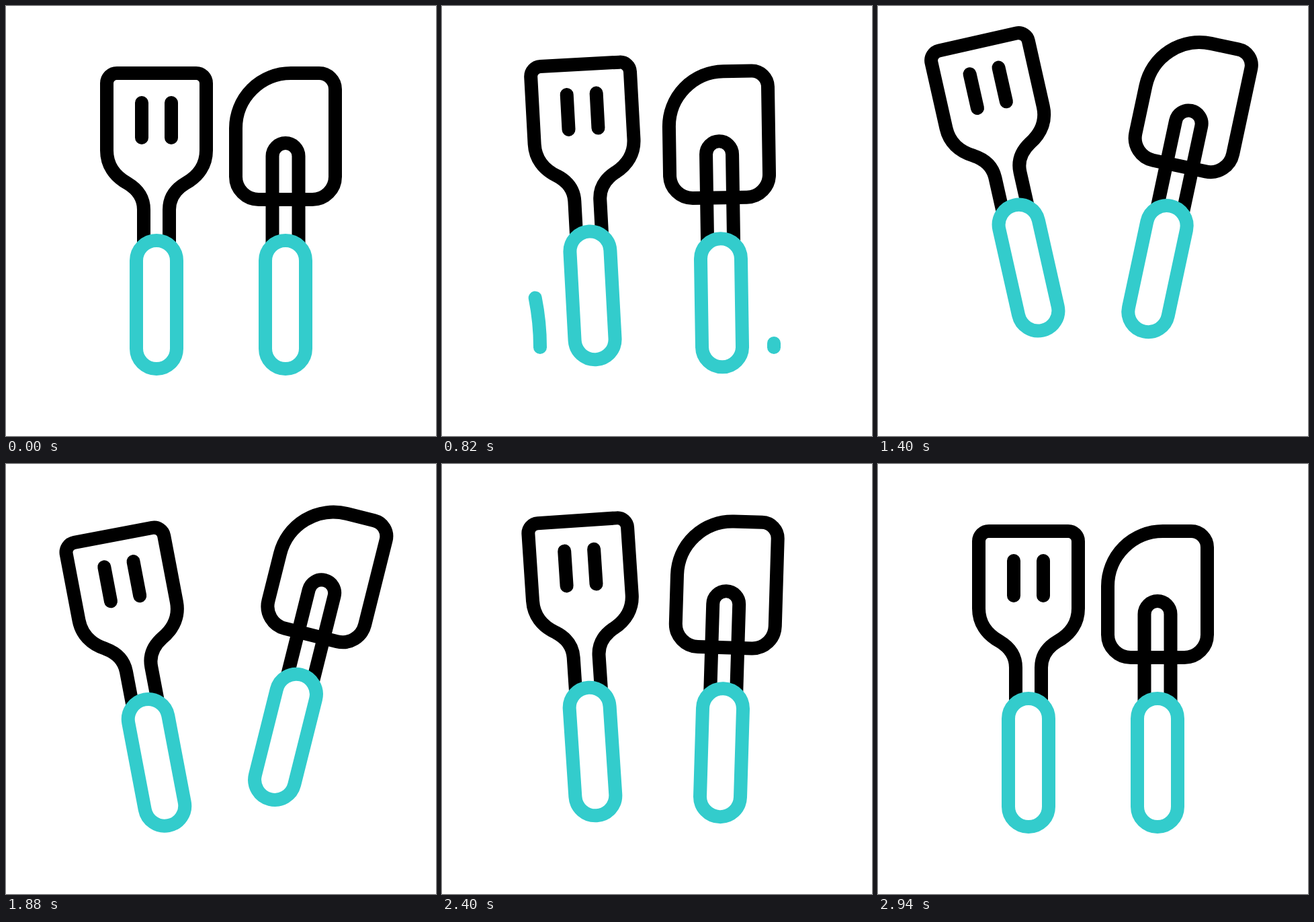
An HTML page that plays this animation: 640 px wide and 640 px high, repeating every 3.14 s.

```html
<!DOCTYPE html>
<html lang="en">
<head>
<meta charset="utf-8">
<title>Spatulas</title>
<style>
  html, body { margin: 0; width: 100%; height: 100%; overflow: hidden; background: #fff; }
  svg { display: block; width: 100%; height: 100%; }
  g { fill: none; stroke: #000; stroke-width: 20; }
  .teal { stroke: #33cccc; }
  .round { stroke-linecap: round; }
</style>
</head>
<body>
<svg viewBox="0 0 640 640">
  <g>
    <path id="swooshL" class="teal round" pathLength="1" d="M146 508A370 370 0 0 0 50 259"/>
    <path id="swooshR" class="teal round" pathLength="1" d="M494 508A370 370 0 0 1 590 259"/>
  </g>
  <g id="turner">
    <path d="M205 354V303C205 286 196 273 181 264C161 253 150 236 150 215V115A15 15 0 0 1 165 100H283A15 15 0 0 1 298 115V215C298 236 287 253 267 264C252 273 243 286 243 303V354"/>
    <path class="round" d="M202 144V196M246 144V196"/>
    <rect class="teal" x="194" y="349" width="60" height="191" rx="30"/>
  </g>
  <g id="scraper">
    <path d="M424 100H466A24 24 0 0 1 490 124V254A34 34 0 0 1 456 288H376A34 34 0 0 1 342 254V182A82 82 0 0 1 424 100Z"/>
    <path d="M396.5 354V223.5A19.5 19.5 0 0 1 435.5 223.5V354"/>
    <rect class="teal" x="386" y="349" width="60" height="191" rx="30"/>
  </g>
</svg>
<script>
const LOOP = 3140, STEP = 20, LAG = 60, TAIL = 133, PIVOT_Y = 444.5;

// Extremes of each motion: time in ms, value, optional ease of the way there
const LIFT = [
  { t: 200, v: 0 }, { t: 533, v: 38.5 }, { t: 1700, v: -58, ease: [.17, .9] },
  { t: 2033, v: 38.5 }, { t: 2400, v: -16.5 }, { t: 2820, v: 0 }
];
const TILT = [
  { t: 260, v: 0 }, { t: 600, v: 5 }, { t: 1097, v: -11.3, ease: [.45, .6] },
  { t: 1760, v: -14.8 }, { t: 2100, v: 6 }, { t: 2500, v: -4.65 }, { t: 2880, v: 0 }
];
const DRAW = [{ t: 727, v: 0 }, { t: 960, v: 1 }];

const el = id => document.getElementById(id);

// Bezier ease, flat at both ends; a and b are the lengths of its handles
function ease(u, [a, b] = [.6, .6]) {
  let lo = 0, hi = 1, s;
  for (let i = 0; i < 24; i++) {
    s = (lo + hi) / 2;
    const r = 1 - s, x = 3 * a * s * r * r + 3 * (1 - b) * s * s * r + s ** 3;
    if (x < u) lo = s; else hi = s;
  }
  return s * s * (3 - 2 * s);
}

function valueAt(keys, t) {
  const i = keys.findIndex(k => k.t > t);
  if (i === 0) return keys[0].v;
  if (i < 0) return keys[keys.length - 1].v;
  const from = keys[i - 1], to = keys[i];
  return from.v + (to.v - from.v) * ease((t - from.t) / (to.t - from.t), to.ease);
}

function pose(tool, swoosh, x, side, t) {
  const angle = side * valueAt(TILT, t);
  el(tool).setAttribute("transform",
    `translate(0 ${valueAt(LIFT, t)}) rotate(${angle} ${x} ${PIVOT_Y})`);

  const head = valueAt(DRAW, t), tail = valueAt(DRAW, t - TAIL);
  const line = el(swoosh).style;
  line.display = head > tail ? "" : "none";
  line.strokeDasharray = `${head - tail} 2`;
  line.strokeDashoffset = -tail;
}

function frame() {
  const now = performance.now() % LOOP, t = now - now % STEP;
  pose("turner", "swooshL", 224, 1, t);
  pose("scraper", "swooshR", 416, -1, t - LAG);
  requestAnimationFrame(frame);
}
frame();
</script>
</body>
</html>
```
